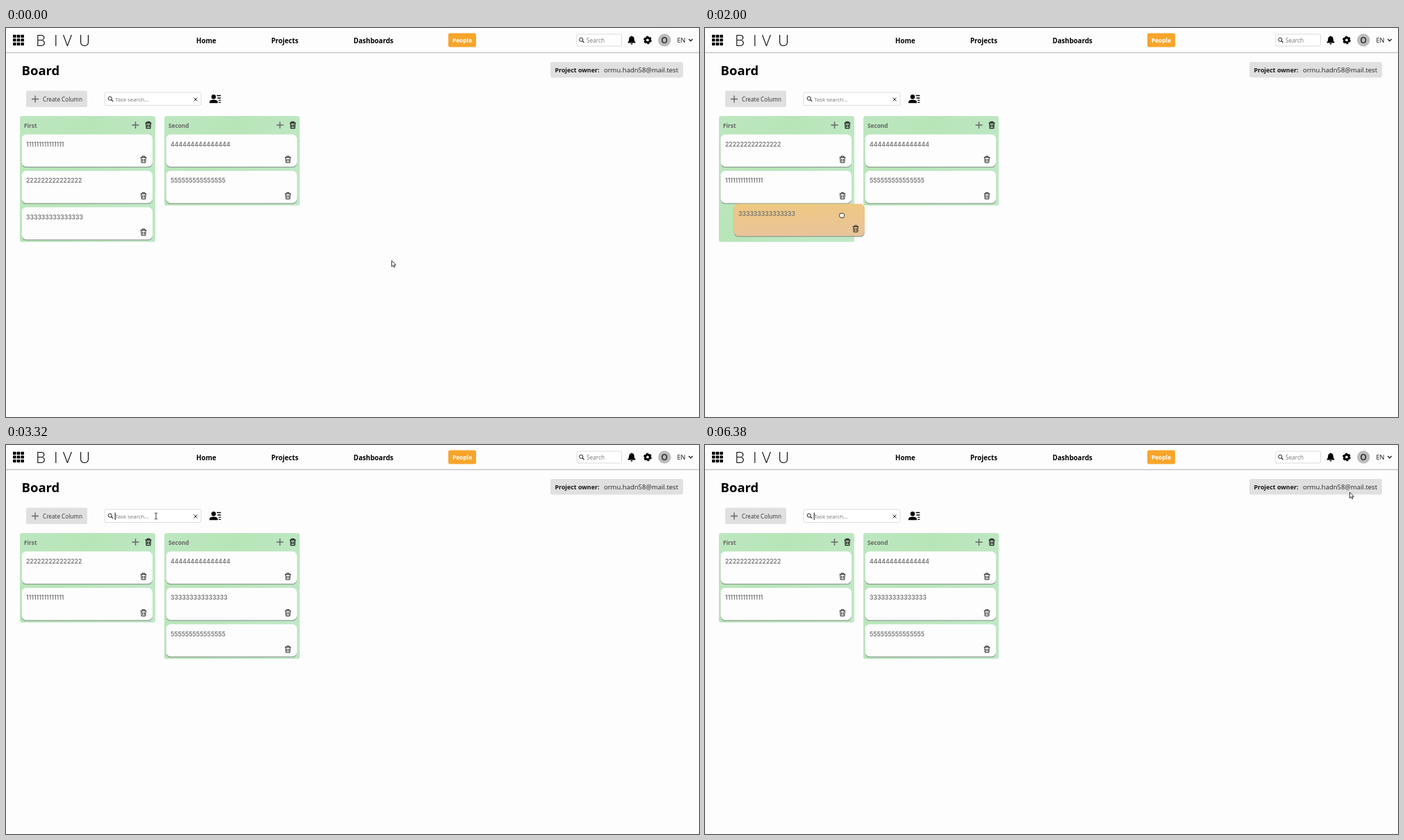
An HTML page that plays this animation: 998x561 px, repeating every 6400 ms.

```html
<!DOCTYPE html>
<html lang="en">
<head>
<meta charset="utf-8">
<title>Board</title>
<style>
  html, body { margin: 0; width: 100%; height: 100%; overflow: hidden; background: #fdfdfe; }
  svg { display: block; width: 998px; height: 561px; font-family: "Open Sans", "Noto Sans", sans-serif; }
  .b { font-weight: 700; }
  .digits { font: 600 8.6px Inter, sans-serif; fill: #747474; }
  .line { fill: none; stroke: #222; }
</style>
</head>
<body>
<svg viewBox="0 0 998 561">
  <defs>
    <linearGradient id="green" x2="1" y2=".5">
      <stop stop-color="#bde7c0"/><stop offset=".45" stop-color="#b8e5b8"/><stop offset="1" stop-color="#c0e8c6"/>
    </linearGradient>
    <linearGradient id="orange" x2=".15" y2="1">
      <stop stop-color="#efc87f"/><stop offset="1" stop-color="#e9c499"/>
    </linearGradient>
    <g id="trash" class="line">
      <path d="M-4.3-3H4.3M-1.8-3V-4.6H1.8V-3M-3.3-3L-2.8 4.6H2.8L3.3-3M-1.2-1V3M1.2-1V3"/>
    </g>
    <path id="plus" d="M-5 0H5M0-5V5" fill="none" stroke="#666" stroke-width="1.4"/>
    <g id="lens" class="line"><circle cx="-.7" cy="-.7" r="2.6"/><path d="M1.2 1.2L3.6 3.6" stroke-width="1.3"/></g>
  </defs>
  <rect width="998" height="561" fill="#fdfdfe"/>

  <g id="grid"></g>
  <text x="43 69 82 105" y="26" font-size="22.4" font-weight="300">BIVU</text>
  <g class="b" font-size="9.7">
    <text x="274" y="21.5">Home</text>
    <text x="382" y="21.5">Projects</text>
    <text x="500.5" y="21.5">Dashboards</text>
  </g>
  <rect x="637" y="7.5" width="40" height="20" rx="2.5" fill="#f7a52b"/>
  <text class="b" x="657" y="20.8" font-size="8.4" fill="#fff" text-anchor="middle">People</text>
  <rect x="822" y="9" width="64.5" height="17" rx="2" fill="#fff" stroke="#dcdcdc"/>
  <use href="#lens" x="829" y="17.5"/>
  <text x="836" y="20.7" font-size="8.3" fill="#777">Search</text>
  <path d="M895.5 20.6Q897.3 19 897.3 16Q897.3 12.6 900.2 12V11.4H901.8V12Q904.7 12.6 904.7 16Q904.7 19 906.5 20.6V21.4H895.5ZM899.4 22.2H902.6Q902.3 23.8 901 23.8T899.4 22.2Z"/>
  <g transform="translate(924 17.4)">
    <circle r="3.4" fill="none" stroke="#000" stroke-width="3"/>
    <circle r="4.9" fill="none" stroke="#000" stroke-width="2" stroke-dasharray="2.9 2.23"/>
  </g>
  <circle cx="948.3" cy="17.5" r="9.2" fill="#bcbcbc"/>
  <text x="948.3" y="21.8" font-size="12" font-weight="600" fill="#222" text-anchor="middle">O</text>
  <text x="966.5" y="20.7" font-size="9.2" fill="#111">EN</text>
  <path class="line" d="M983.2 16L986 18.8L988.8 16" stroke-width="1.4"/>
  <path d="M0 35.5H998" stroke="#c3c4ca" stroke-width="1.3"/>

  <text class="b" x="22.5" y="67.8" font-size="18.5">Board</text>
  <rect x="784" y="49" width="191" height="22.5" rx="3" fill="#e0e0e0"/>
  <text class="b" x="790.5" y="64" font-size="8.85" fill="#151515">Project owner:</text>
  <text x="861" y="64" font-size="9.5" fill="#222">ormu.hadn58@mail.test</text>
  <rect x="29" y="90.5" width="88" height="23.5" rx="2" fill="#e0e0e0"/>
  <use href="#plus" x="42" y="102.5"/>
  <text x="53" y="106" font-size="8.2" fill="#333">Create Column</text>
  <rect x="142" y="93" width="139" height="18.5" rx="1.5" fill="#fff" stroke="#dcdcdc"/>
  <use href="#lens" x="150.5" y="102.3"/>
  <text x="157" y="106" font-size="7.9" fill="#777">Task search...</text>
  <path class="line" d="M270.5 100.5L275.5 105.5M275.5 100.5L270.5 105.5"/>
  <path id="caret" d="M157.2 97.5V108" stroke="#111"/>
  <g>
    <circle cx="299" cy="99.3" r="3.2"/>
    <path d="M293 108.3V106.5Q293.5 103.6 299 103.6T305 106.5V108.3Z"/>
    <path d="M303.6 97.5H309.4M304.5 101H309.4M306.2 104.4H309.4M306.2 107.4H309.4" stroke="#000" stroke-width="1.4"/>
  </g>
  <g id="board"></g>
  <g id="cursor" fill="#fff" stroke="#222" stroke-width=".9" stroke-linejoin="round">
    <path data-kind="arrow" d="M0 0V8.6L2 6.8L3.3 9.6L4.7 9L3.4 6.3H6Z"/>
    <path data-kind="hand" d="M-1 1V7L-2.4 5.6Q-3.6 5.4-3.2 6.6L-.6 10.6V11.6H4.4V10.4Q5.3 8.8 5.1 5.4Q4.6 4.3 3.8 4.9Q3.2 4 2.4 4.6Q1.8 3.8 .9 4.3V1Q0-.6-1 1Z"/>
    <path data-kind="grab" d="M-2.8-2.2Q-2-3.4-1-2.6Q0-3.6 1-2.6Q2.2-3.2 2.7-2Q3.7-2 3.6-.8Q3.7 1.6 2.5 3.6H-1.8Q-3.6 1.8-3.5.2Q-3.8-.8-2.8-.9Z"/>
    <path data-kind="beam" d="M-2-4.3H-.6L0-3.8L.6-4.3H2M0-3.8V3.8M-2 4.3H-.6L0 3.8L.6 4.3H2" fill="none"/>
  </g>
</svg>
<script>
const LOOP = 6400, PITCH = 52.5, TOP = 153.5, LEFT = [22.5, 230.5];
const $ = id => document.getElementById(id);

const add = (parent, markup) => {
  parent.insertAdjacentHTML('beforeend', markup);
  return parent.lastElementChild;
};

for (let i = 0; i < 9; i++) {
  add($('grid'), `<rect x="${10 + i % 3 * 5.7}" y="${9.7 + Math.floor(i / 3) * 5.6}" width="4.5" height="4.3" rx=".6"/>`);
}

const columns = ['First', 'Second'].map((name, i) => add($('board'), `
  <g transform="translate(${20 + i * 208} 127)">
    <rect width="195" rx="3" fill="url(#green)"/>
    <text class="b" x="6" y="16.5" font-size="8.3" fill="#666">${name}</text>
    <use href="#plus" x="166.5" y="13"/>
    <use href="#trash" x="185" y="13" stroke-width="1.3"/>
  </g>`).querySelector('rect'));

// Dragged cards come last so that they lie on top.
const cards = {};
for (const n of [1, 4, 5, 2, 3]) {
  cards[n] = add($('board'), `
    <g>
      <rect y="1.3" width="188.5" height="46.5" rx="6.5" fill="#8f9f92"/>
      <rect class="face" width="188.5" height="46.5" rx="6.5"/>
      <text class="digits" x="6.5" y="17.3">${String(n).repeat(15)}</text>
      <use href="#trash" x="175.5" y="36"/>
    </g>`);
}

const ramp = (t, from, to) => {
  const p = Math.min(1, Math.max(0, (t - from) / (to - from)));
  return p * p * (3 - 2 * p);
};
const mix = (a, b, p) => a.map((v, i) => v + (b[i] - v) * p);
const slot = (col, row) => [LEFT[col], TOP + row * PITCH];

const path = [
  [0, 555.5, 335.5], [140, 555.5, 335.5], [700, 150, 225], [940, 150, 225],
  [1260, 153, 180], [1400, 153, 180], [1680, 178, 275], [1860, 178, 275],
  [2000, 197, 270], [2320, 326, 216], [2680, 326, 216], [3200, 216, 102.5],
  [5640, 216, 102.5], [6240, 928.5, 68]
];
const kinds = [
  [0, 'arrow'], [590, 'hand'], [800, 'grab'], [1340, 'hand'], [1780, 'grab'],
  [2360, 'hand'], [2840, 'arrow'], [3110, 'beam'], [5760, 'arrow']
];

function pointer(t) {
  const i = path.findLastIndex(k => k[0] <= t);
  const a = path[i], b = path[i + 1];
  return b ? mix(a.slice(1), b.slice(1), ramp(t, a[0], b[0])) : a.slice(1);
}

// Follows the pointer while held, then settles into its new slot.
function dragged(t, home, goal, grab, drop) {
  if (t < grab) return home;
  const start = pointer(grab), now = pointer(Math.min(t, drop));
  const held = home.map((v, i) => v + now[i] - start[i]);
  return mix(held, goal, ramp(t, drop, drop + 180));
}

function place(n, [x, y], held) {
  cards[n].setAttribute('transform', `translate(${x} ${y})`);
  cards[n].querySelector('.face').setAttribute('fill', held ? 'url(#orange)' : '#fdfdfe');
}

function draw(t) {
  const shift = ramp(t, 2190, 2380);
  place(1, mix(slot(0, 0), slot(0, 1), ramp(t, 1100, 1290)));
  place(4, slot(1, 0));
  place(5, mix(slot(1, 1), slot(1, 2), shift));
  place(2, dragged(t, slot(0, 1), slot(0, 0), 800, 1340), t >= 800 && t < 1520);
  place(3, dragged(t, slot(0, 2), slot(1, 1), 1780, 2360), t >= 1780 && t < 2540);
  columns[0].setAttribute('height', t < 2540 ? 181.5 : 129);
  columns[1].setAttribute('height', 129 + PITCH * shift);

  const kind = kinds.findLast(k => k[0] <= t)[1];
  $('cursor').setAttribute('transform', `translate(${pointer(t)})`);
  for (const shape of $('cursor').children) {
    shape.style.display = shape.dataset.kind === kind ? '' : 'none';
  }
  $('caret').style.display = t >= 3320 && (t - 3320) % 1000 < 500 ? '' : 'none';
}

const began = performance.now();
function frame() {
  draw((performance.now() - began) % LOOP);
  requestAnimationFrame(frame);
}
frame();
</script>
</body>
</html>
```
